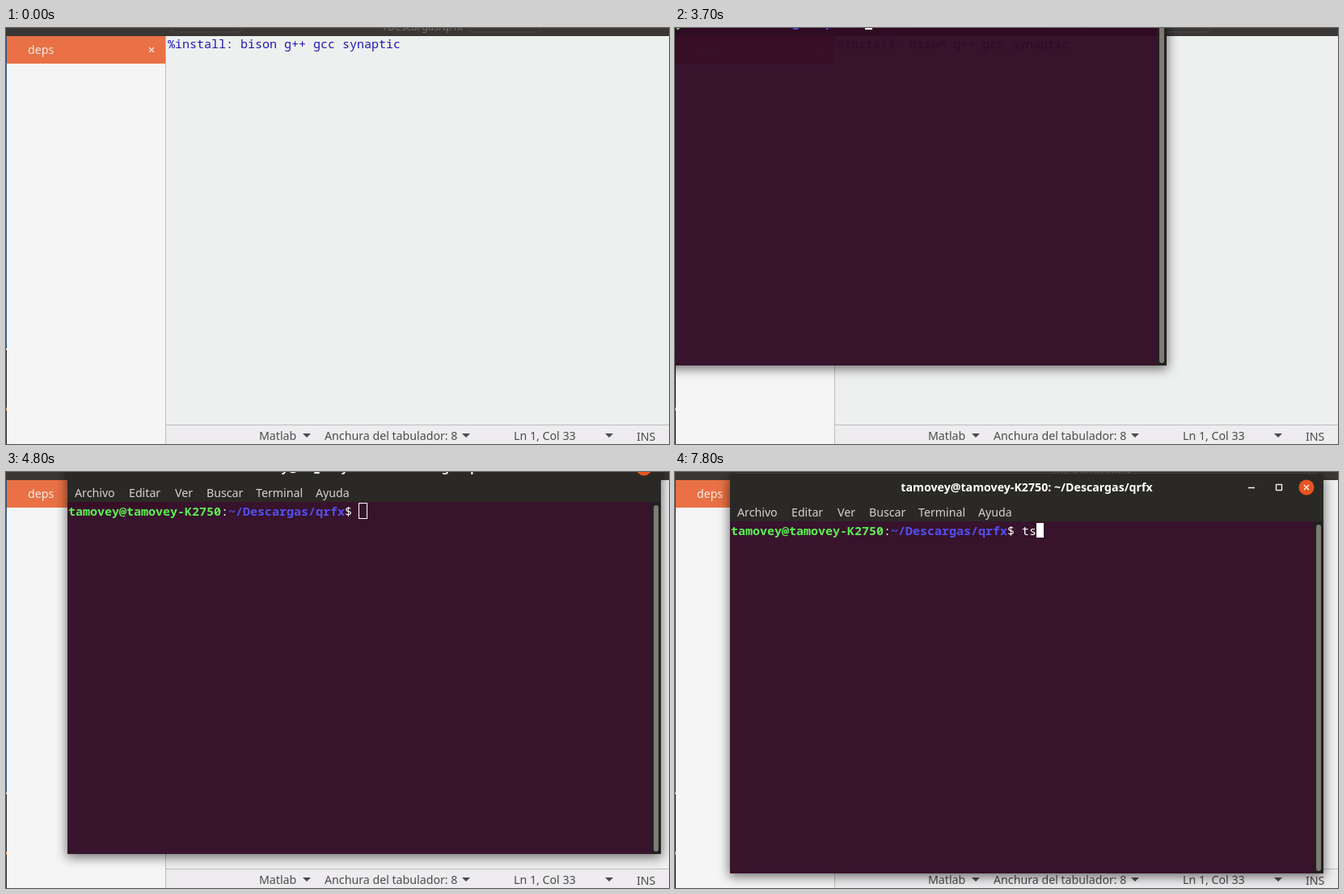
An HTML page that plays this animation: 820x514 px, repeating every 8 s.

```html
<!DOCTYPE html>
<html lang="es">
<head>
<meta charset="utf-8">
<title>Terminal</title>
<style>
html, body { margin: 0; width: 100%; height: 100%; overflow: hidden; }
#stage { position: relative; width: 820px; height: 514px; overflow: hidden; background: #eef0ef; }
#stage svg { position: absolute; left: 0; top: 0; overflow: visible; }
text { white-space: pre; }
.ui { font: 14.2px "Noto Sans", sans-serif; }
.title { font: bold 14.2px "Noto Sans", sans-serif; text-anchor: middle; fill: #fff; }
.mono { font: 15px "Noto Sans Mono", monospace; }
.bold { font-weight: bold; }
#term {
  position: absolute; left: 0; top: 0; width: 734px; height: 495px; margin-top: 1px;
  border-radius: 8px 8px 0 0; box-shadow: 0 3px 9px rgba(0,0,0,.3);
}
#term.focus { box-shadow: 0 3px 14px 1px rgba(0,0,0,.55); }
#term svg { top: -1px; }
#paper { fill: #300a24; fill-opacity: .92; }
.focus #paper { fill-opacity: .955; }
#thumb { fill: #55534e; }
.focus #thumb { fill: #7d7a74; }
</style>
</head>
<body>
<div id="stage">
  <svg width="820" height="514">
    <rect width="820" height="10" fill="#3a3735"/>
    <text class="ui" x="467" y="3" fill="#77706a" style="font-size:13px">/Descargas/qrfx</text>
    <path d="M203 1q1 4 5 4h79q4 0 5-4M572 1q1 4 5 4h80q4 0 5-4" fill="none" stroke="#4a4643"/>
    <rect y="10" width="197" height="504" fill="#f5f5f5"/>
    <rect x="197" y="10" width="1" height="504" fill="#bcbcbc"/>
    <rect x="1" y="10" width="196" height="34" fill="#e97145"/>
    <text class="ui" x="27" y="32" fill="#fbeae3">deps</text>
    <path d="M177 24l6 6m0-6l-6 6" stroke="#fbeae3" stroke-width="1.3"/>
    <rect y="10" width="1" height="386" fill="#2b5580"/>
    <rect y="398" width="1" height="116" fill="#2b2b30"/>
    <rect y="469" width="1" height="4" fill="#e08a3c"/>
    <text class="mono" x="200" y="25" fill="#1e18bd">%install: bison g++ gcc synaptic</text>
    <rect x="198" y="490" width="622" height="24" fill="#eeecef"/>
    <rect x="198" y="490" width="622" height="1" fill="#bcbcbc"/>
    <g class="ui" fill="#4b4b4b">
      <text x="313" y="509">Matlab</text>
      <text x="394" y="509">Anchura del tabulador: 8</text>
      <text x="628" y="509">Ln 1, Col 33</text>
      <text x="780" y="510">INS</text>
      <path d="M367 501h10l-5 5zM564 501h10l-5 5zM741 501h10l-5 5z"/>
    </g>
  </svg>

  <div id="term">
    <svg width="734" height="496">
      <path d="M0 61V9q0-8 8-8h718q8 0 8 8v52z" fill="#2a2926"/>
      <path d="M7 1.5h720" stroke="#45433f"/>
      <rect id="paper" y="61" width="722" height="435"/>
      <rect x="722" y="61" width="12" height="435" fill="#22211f"/>
      <rect id="thumb" x="725" y="65" width="6" height="428" rx="3"/>
      <text class="title" x="367" y="24">tamovey@tamovey-K2750: ~/Descargas/qrfx</text>
      <path d="M641 19.5h8" stroke="#fff" stroke-width="1.4"/>
      <rect x="675.5" y="15.5" width="7" height="7" fill="none" stroke="#fff" stroke-width="1.3"/>
      <circle cx="713" cy="19" r="9.5" fill="#e95420"/>
      <path d="M710 16l6 6m0-6l-6 6" stroke="#fff" stroke-width="1.3"/>
      <g class="ui" fill="#d5d3cf">
        <text x="9" y="55">Archivo</text>
        <text x="76" y="55">Editar</text>
        <text x="133" y="55">Ver</text>
        <text x="172" y="55">Buscar</text>
        <text x="233" y="55">Terminal</text>
        <text x="307" y="55">Ayuda</text>
      </g>
      <text class="mono" x="1" y="78" fill="#fff"><tspan class="bold" fill="#5cf051">tamovey@tamovey-K2750</tspan>:<tspan class="bold" fill="#5350ee">~/Descargas/qrfx</tspan>$ <tspan id="typed"></tspan></text>
      <rect id="hollow" x="360.5" y="62.5" width="10" height="19" fill="none" stroke="#fff"/>
      <rect id="block" x="361" y="63" width="9" height="18" fill="#fff"/>
    </svg>
  </div>

  <svg id="mouse" width="20" height="20">
    <path id="hand" d="M4 2.5q1-2 2.5-.5q1.500-1.500 2.500 0q1.500-1.200 2.500.3q2-.5 2 1.700v4l-1.500 2.500v2H5v-2L1 7.500q0-2 3-1z" fill="#fff" stroke="#222" stroke-width=".8"/>
    <path id="arrow" d="M.5.5v15l3.500-3.300 2.400 5.600 2.200-1-2.400-5.400h4.800z" fill="#111" stroke="#fff" stroke-width=".9"/>
    <g id="beam" fill="none">
      <path d="M1 1.500h2.500l1 1 1-1H8M4.500 2v14M1 16.500h2.500l1-1 1 1H8" stroke="#fff" stroke-width="2.400"/>
      <path d="M1 1.500h2.500l1 1 1-1H8M4.500 2v14M1 16.500h2.500l1-1 1 1H8" stroke="#111"/>
    </g>
  </svg>
</div>

<script>
const LOOP = 8000;
const $ = id => document.getElementById(id);

// Each track row: start time, then the values held until the next row.
const place = [
  [0, -126, -79], [4000, -40, -60], [4200, 2, -57], [4300, 21, -54],
  [4500, 42, -47], [4600, 58, -39], [4700, 70, -31], [4800, 76, -24],
  [5000, 76, -12], [5100, 73, -3], [5200, 71, 0], [5500, 69, 0], [5600, 68, 0]
];
const fade = [[0, 0], [500, .9], [700, 1]];
const focus = [[0, false], [3700, true]];
const caret = [
  [0, 'hollow'], [3700, 'block'], [4000, 'hollow'],
  [5800, 'block'], [6400, 'off'], [7000, 'block']
];
const typing = [[0, ''], [7300, 't'], [7800, 'ts']];
const pointer = [
  [0, 'none'], [1100, 'arrow', 686, 491], [1300, 'beam', 436, 46], [1400, 'none'],
  [4000, 'hand'], [5500, 'arrow', 370, 14], [6000, 'arrow', 378, 17],
  [6100, 'arrow', 400, 30], [6200, 'arrow', 428, 47], [6300, 'beam', 452, 64],
  [6400, 'beam', 461, 72], [7400, 'none']
];

const at = (track, t) => track.findLast(row => row[0] <= t).slice(1);
const show = (id, on) => { $(id).style.display = on ? '' : 'none'; };
const move = (id, x, y) => { $(id).style.transform = `translate(${x}px, ${y}px)`; };

function draw(t) {
  const [x, y] = at(place, t);
  move('term', x, y);
  $('term').style.opacity = at(fade, t)[0];
  $('term').classList.toggle('focus', at(focus, t)[0]);

  const [text] = at(typing, t);
  const [shape] = at(caret, t);
  $('typed').textContent = text;
  $('block').setAttribute('x', 361 + 9 * text.length);
  show('block', shape === 'block');
  show('hollow', shape === 'hollow');

  // While dragging, the hand stays fixed to the title bar.
  const [kind, px = x + 300, py = y + 14] = at(pointer, t);
  move('mouse', px, py);
  for (const id of ['hand', 'arrow', 'beam']) show(id, id === kind);
}

function tick() {
  draw(performance.now() % LOOP);
  requestAnimationFrame(tick);
}
tick();
</script>
</body>
</html>
```
